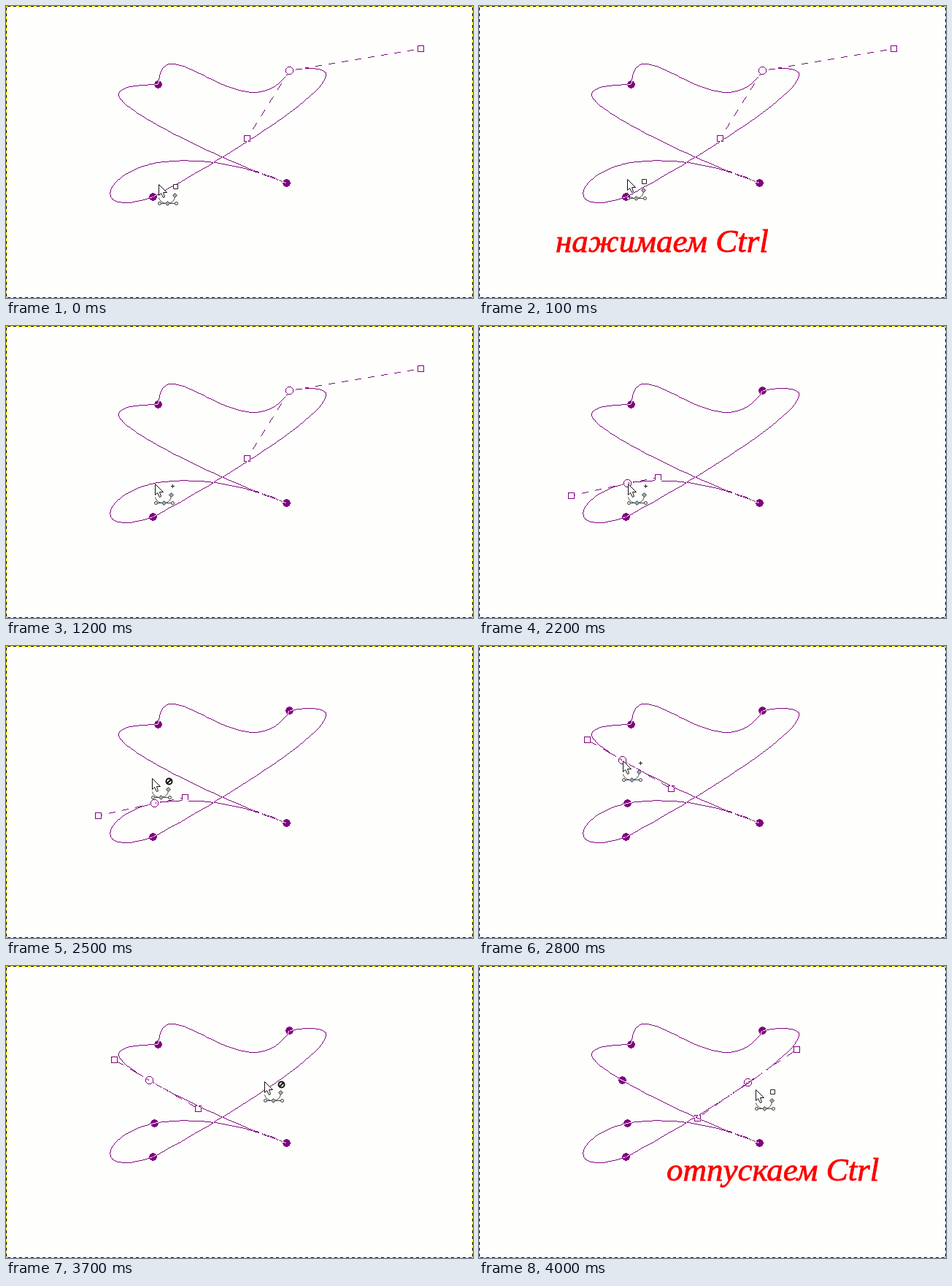
An HTML page with a canvas for the animation above (5500 ms loop, 640 by 400 pixels).

```html
<!DOCTYPE html>
<html lang="ru">
<head>
<meta charset="utf-8">
<title>Path editing</title>
<style>
  html, body { margin: 0; width: 100%; height: 100%; overflow: hidden; background: #fefefc; }
  canvas { position: absolute; left: 0; top: 0; width: 640px; height: 400px; }
  svg { position: absolute; left: 0; top: 0; }
  text {
    font: italic 45px "Liberation Serif", "Noto Serif", serif;
    fill: #f00; stroke: #f00; stroke-width: .8px; visibility: hidden;
  }
</style>
</head>
<body>
<canvas id="stage" width="640" height="400"></canvas>
<svg width="640" height="400">
  <text id="press" x="105" y="337">нажимаем Ctrl</text>
  <text id="release" x="257" y="294">отпускаем Ctrl</text>
</svg>
<script>
const W = 640, H = 400, LOOP = 5500, TICK = 100;
const PURPLE = '#800080', PAPER = '#fefefc';
const ctx = document.getElementById('stage').getContext('2d');
const press = document.getElementById('press');
const release = document.getElementById('release');

// Each stroke: start point followed by cubic segments.
const strokes = [
  [208,107, 214,17, 330,181, 388,88],
  [388,88, 568,58, 206,260, 201,261],
  [201,261, 119,290, 126,232, 203,215, 245,207, 314,211, 384,242],
  [384,242, 335,224, 263,195, 196,156, 148,128, 128,108, 208,107]
];

const anchors = [
  { at: [208,107], from: 0 },
  { at: [201,261], from: 0 },
  { at: [384,242], from: 0 },
  { at: [388,88], from: 0, until: 2200, handles: [[330,181], [568,58]] },
  { at: [203,215], from: 2200, until: 2800, handles: [[126,232], [245,207]] },
  { at: [196,156], from: 2800, until: 3900, handles: [[148,128], [263,195]] },
  { at: [368,159], from: 3900, until: LOOP, handles: [[435,114], [299,208]] }
];

// Pointer keys: time, x, y
const pointerKeys = [
  [0,209,244], [100,203,237], [1000,203,237], [1100,196,229],
  [1200,204,216], [2200,204,216], [2700,197,157], [2800,197,157],
  [3200,262,158], [3700,354,158], [3800,368,159], [3900,368,159],
  [4000,379,169], [LOOP,379,169]
];

function pointerAt(t) {
  const i = pointerKeys.findIndex(k => k[0] > t);
  const [t0, x0, y0] = pointerKeys[i - 1], [t1, x1, y1] = pointerKeys[i];
  const p = (t - t0) / (t1 - t0);
  return [Math.round(x0 + (x1 - x0) * p), Math.round(y0 + (y1 - y0) * p)];
}

function badgeAt(t) {
  if (t < 1200 || t >= 4000) return 'square';
  const searching = (t > 2200 && t < 2700) || (t > 2800 && t < 3800);
  return searching ? 'forbidden' : 'plus';
}

// Overlapping marks cancel each other, pixel by pixel.
const ink = new Uint8Array(W * H);
const toggle = pixels => { for (const p of pixels) ink[p] ^= 1; };
const pixel = (x, y) => Math.round(y) * W + Math.round(x);

function addLine(set, [x0, y0], [x1, y1], isOn = () => true) {
  const n = Math.max(1, Math.round(Math.max(Math.abs(x1 - x0), Math.abs(y1 - y0))));
  for (let i = 0; i <= n; i++) {
    if (isOn(i, n)) set.add(pixel(x0 + (x1 - x0) * i / n, y0 + (y1 - y0) * i / n));
  }
}

function curvePixels(c) {
  const set = new Set(), steps = 40;
  for (let k = 0; k + 7 < c.length; k += 6) {
    const at = (t, d) => {
      const u = 1 - t;
      return u*u*u*c[k+d] + 3*u*u*t*c[k+2+d] + 3*u*t*t*c[k+4+d] + t*t*t*c[k+6+d];
    };
    const point = i => [Math.round(at(i / steps, 0)), Math.round(at(i / steps, 1))];
    for (let i = 0; i < steps; i++) addLine(set, point(i), point(i + 1));
  }
  return set;
}

const curves = strokes.map(curvePixels);

function discPixels([cx, cy], inner, outer) {
  const set = new Set();
  for (let y = -6; y <= 6; y++) {
    for (let x = -6; x <= 6; x++) {
      const r = Math.hypot(x, y);
      if (r >= inner && r <= outer) set.add(pixel(cx + x, cy + y));
    }
  }
  return set;
}

function squarePixels([x, y]) {
  const set = new Set();
  const corners = [[x-4,y-4], [x+4,y-4], [x+4,y+4], [x-4,y+4]];
  corners.forEach((c, i) => addLine(set, c, corners[(i + 1) % 4]));
  return set;
}

function dashPixels(a, b) {
  const set = new Set();
  addLine(set, a, b, (i, n) => i % 18 < 9 && i < n - 4);
  return set;
}

function drawPath(t) {
  ink.fill(0);
  curves.forEach(toggle);
  for (const { at, from, until = 0, handles = [] } of anchors) {
    if (t < from) continue;
    if (t >= until) {
      toggle(discPixels(at, 0, 5.1));
      continue;
    }
    toggle(discPixels(at, 4.6, 5.4));
    for (const h of handles) {
      toggle(dashPixels(at, h));
      toggle(squarePixels(h));
    }
    ink[pixel(...at)] = 0;
  }
  ctx.fillStyle = PURPLE;
  ink.forEach((on, i) => { if (on) ctx.fillRect(i % W, Math.floor(i / W), 1, 1); });
}

function drawBorder() {
  const edge = (x, y, w, h, color) => { ctx.fillStyle = color; ctx.fillRect(x, y, w, h); };
  for (let i = 0; i < W; i++) {
    const color = (i + 2) % 8 < 4 ? '#ff0' : '#000';
    edge(i, 0, 1, 1, color);
    edge(i, H - 1, 1, 1, color);
    if (i < H) {
      edge(0, i, 1, 1, color);
      edge(W - 1, i, 1, 1, color);
    }
  }
}

function shape(draw, stroke, fill) {
  ctx.beginPath();
  draw();
  if (fill) { ctx.fillStyle = fill; ctx.fill(); }
  ctx.strokeStyle = stroke;
  ctx.stroke();
}

function polygon(...points) {
  points.forEach(([x, y]) => ctx.lineTo(x, y));
  ctx.closePath();
}

const diamond = (x, y) => polygon([x, y-3], [x+3, y], [x, y+3], [x-3, y]);

const badges = {
  square() { shape(() => ctx.rect(20, 0, 6, 6), '#222', '#fff'); },
  plus() {
    ctx.fillStyle = '#222';
    ctx.fillRect(21.5, 2.5, 5, 1);
    ctx.fillRect(23.5, 0.5, 1, 5);
  },
  forbidden() {
    ctx.lineWidth = 2;
    shape(() => {
      ctx.arc(23, 4, 4, 0, 7);
      ctx.moveTo(20.2, 6.8);
      ctx.lineTo(25.8, 1.2);
    }, '#111');
  }
};

function drawPointer(t) {
  const [x, y] = pointerAt(t);
  ctx.save();
  ctx.translate(x + .5, y + .5);
  ctx.lineWidth = 1;
  shape(() => {
    ctx.moveTo(0, 18);
    ctx.bezierCurveTo(1, 23, 6, 26, 11, 26);
    ctx.bezierCurveTo(18, 26, 22, 22, 22, 15);
    ctx.moveTo(1, 26);
    ctx.lineTo(24, 26);
  }, '#444');
  for (const cx of [1, 24]) shape(() => ctx.arc(cx, 26, 2, 0, 7), '#333', '#eee');
  const tint = badgeAt(t) === 'plus' ? '#8ca9be' : '#aaa';
  shape(() => diamond(12, 26), '#444', tint);
  shape(() => diamond(22, 15), '#444', tint);
  shape(() => polygon([0,0], [0,15], [3,12], [6,18], [8,17], [6,11], [11,11]), '#111', '#fff');
  badges[badgeAt(t)]();
  ctx.restore();
}

function show(element, on) { element.style.visibility = on ? 'visible' : 'hidden'; }

function draw(t) {
  ctx.fillStyle = PAPER;
  ctx.fillRect(0, 0, W, H);
  drawPath(t);
  drawPointer(t);
  drawBorder();
  show(press, t >= 100 && t < 1100);
  show(release, t >= 4000);
}

const start = performance.now();
let shown = -1;

function frame() {
  const elapsed = Math.max(0, performance.now() - start) % LOOP;
  const tick = Math.floor(elapsed / TICK) * TICK;
  if (tick !== shown) draw(shown = tick);
  requestAnimationFrame(frame);
}
frame();
</script>
</body>
</html>
```
